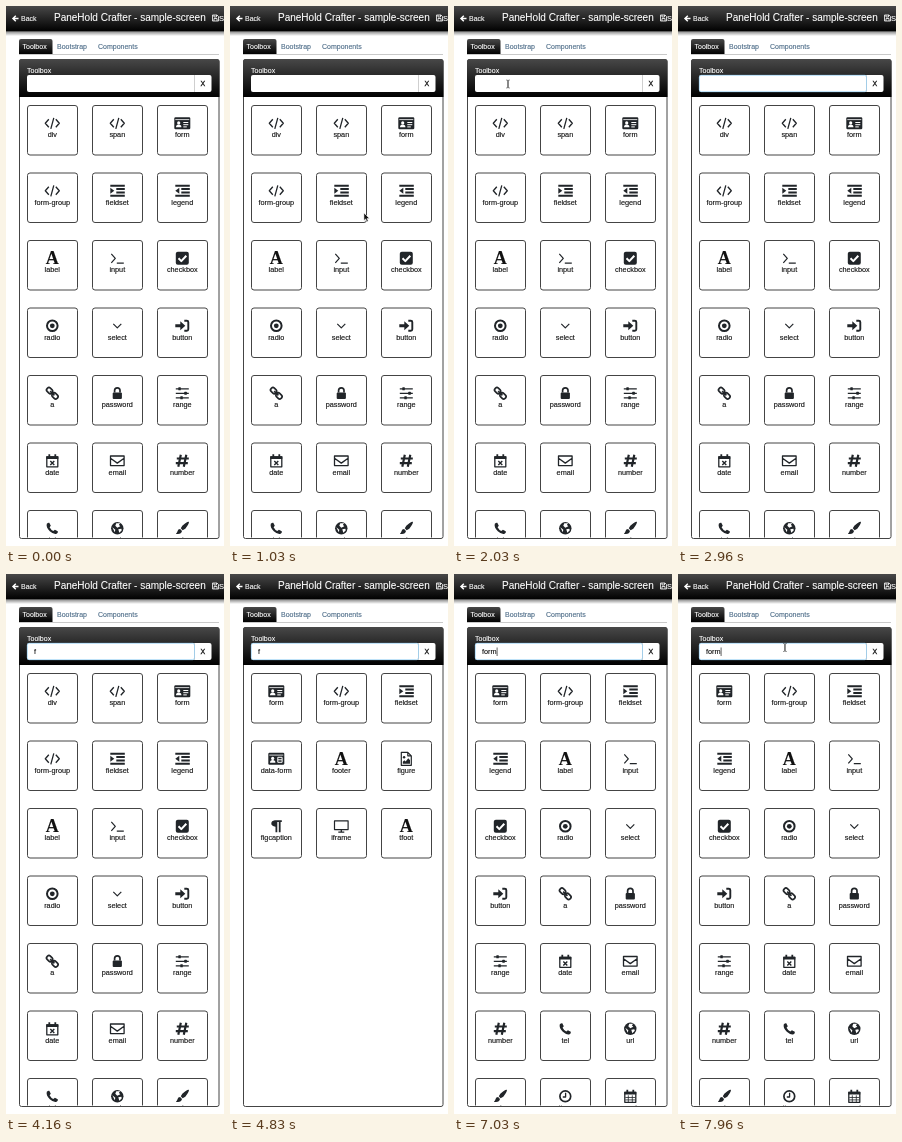
An HTML page that plays this animation: 218 px wide and 540 px high, repeating every 8000 ms.

```html
<!DOCTYPE html>
<html lang="en">
<head>
<meta charset="utf-8">
<title>Toolbox search</title>
<style>
html, body { margin: 0; height: 100%; overflow: hidden; background: #fff; }
svg { display: block; width: 100vw; height: 100vh; }
text { font: 7px "Liberation Sans", Arial, sans-serif; fill: #111; stroke: #111; stroke-width: .12px; }
.light { fill: #fff; stroke: #fff; }
.link { fill: #4d6c88; stroke: #4d6c88; }
.title { font-size: 10px; }
.label { font-size: 7.3px; text-anchor: middle; }
.serif { font: bold 18px "Liberation Serif", serif; text-anchor: middle; }
</style>
</head>
<body>
<svg viewBox="0 0 218 540">
  <defs>
    <linearGradient id="dark" x2="0" y2="1"><stop stop-color="#484848"/><stop offset="1"/></linearGradient>
    <linearGradient id="shade" x2="0" y2="1"><stop stop-opacity=".45"/><stop offset="1" stop-opacity="0"/></linearGradient>
    <clipPath id="inside"><path d="M13 91H213V531.500H13Z"/></clipPath>
  </defs>
  <rect width="218" height="540" fill="#fff"/>
  <rect width="218" height="25.500" fill="url(#dark)"/>
  <rect y="25.500" width="218" height="4.500" fill="url(#shade)"/>
  <path d="M12.500 12.500H7.500M9.800 9.800L7 12.500L9.800 15.200" fill="none" stroke="#fff" stroke-width="1.500"/>
  <text class="light" x="15" y="14.700">Back</text>
  <text class="light title" x="48" y="15.200">PaneHold Crafter - sample-screen</text>
  <path d="M206.500 9H211L212.500 10.500V15H206.500ZM208 9V11H210.500V9M208 15V12.500H211V15" fill="none" stroke="#fff" stroke-width=".8"/>
  <text class="light" x="213" y="15" style="font-size:7.500px">Save</text>

  <path d="M13 48.500H213" stroke="#bbb" stroke-width=".8"/>
  <path d="M13 48V35Q13 33 15 33H44.500Q46.500 33 46.500 35V48Z" fill="url(#dark)"/>
  <text class="light" x="16.500" y="43">Toolbox</text>
  <text class="link" x="51" y="43">Bootstrap</text>
  <text class="link" x="92" y="43">Components</text>

  <rect x="13.500" y="53.500" width="199.500" height="479" rx="2" fill="#fff" stroke="#444"/>
  <path d="M13 91V55.500Q13 53 15.500 53H211Q213.500 53 213.500 55.500V91Z" fill="url(#dark)"/>
  <text class="light" x="21" y="66.500">Toolbox</text>
  <rect x="21" y="69" width="184.500" height="17" rx="2" fill="#fff"/>
  <path d="M188.500 69V86" stroke="#bbb" stroke-width=".7"/>
  <text x="194.500" y="80" style="stroke-width:.3px">X</text>
  <rect id="ring" x="21.300" y="69.300" width="167.200" height="16.400" rx="2" fill="none" stroke="#8fccf2" stroke-width=".7"/>
  <text id="query" x="28" y="80" style="font-size:7.300px"></text>
  <path id="caret" stroke="#222" stroke-width=".7"/>
  <g clip-path="url(#inside)" id="list"></g>
  <path id="arrow" d="M0 0V7.500L1.800 6L3 8.800L4.300 8.200L3.100 5.600H5.500Z" fill="#111" stroke="#fff" stroke-width=".5"/>
  <path id="beam" d="M-1.700-4Q0-4 0-3V3Q0 4-1.700 4M1.700-4Q0-4 0-3V3Q0 4 1.700 4" fill="none" stroke="#333" stroke-width=".7"/>
</svg>
<script>
const $ = id => document.getElementById(id);
const ink = '#212529';
const line = (d, w = 1.3, c = ink) =>
  `<path d="${d}" fill="none" stroke="${c}" stroke-width="${w}" stroke-linejoin="round"/>`;
const fill = (d, c = ink) => `<path d="${d}" fill="${c}"/>`;
const dot = (x, y, r, c = ink) => `<circle cx="${x}" cy="${y}" r="${r}" fill="${c}"/>`;
const ring = (r, w) => `<circle r="${r}" fill="none" stroke="${ink}" stroke-width="${w}"/>`;
const box = (x, y, w, h, r, c = ink) =>
  `<rect x="${x}" y="${y}" width="${w}" height="${h}" rx="${r}" fill="${c}"/>`;

const card = box(-8, -6, 16, 12, 1.2) + line('M-7-3.700H7', .8, '#fff') +
  dot(-3.6, -.4, 1.6, '#fff') + fill('M-6.300 4Q-6.300 1.300-3.600 1.300T-.9 4Z', '#fff');
const bars = line('M-7-5H7.500M-1-1.700H7.500M-1 1.700H7.500M-7 5H7.500', 2);
const calendar = line('M-5.500-4H5.500V6H-5.500Z') + fill('M-6-4.600H6V-1.800H-6Z') + line('M-3-6.500V-4M3-6.500V-4', 1.8);
const letter = '<text class="serif" y="6">A</text>';
const icons = {
  code: line('M-3.500-4L-7 0L-3.500 4M3.500-4L7 0L3.500 4M1.500-5.500L-1.500 5.500', 1.3),
  card: card + line('M1-.8H6M1 1.400H6M1 3.600H4.500', 1, '#fff'),
  dataCard: card + line('M1.500-1.500H5.800V3.500H1.500ZM1.500 1H5.800', 1, '#fff'),
  indent: bars + fill('M-7-3L-3 0L-7 3Z'),
  outdent: bars + fill('M-3-3L-7 0L-3 3Z'),
  letter,
  pilcrow: fill('M5.500-6V-4.300H4.300V6H2.500V-4.300H1V6H-.8V.5Q-5-.2-5-2.800T-1.500-6Z'),
  prompt: line('M-6-4.500L-2 0L-6 4.500M-.5 4.800H6.500', 1.2),
  check: box(-6.5, -6.5, 13, 13, 2) + line('M-3.800 0L-1 2.800L4-2.500', 2, '#fff'),
  radio: ring(5.3, 2) + dot(0, 0, 2.4),
  chevron: line('M-4-2L0 2L4-2', 1.2),
  enter: fill('M-7-1.500H-2V-4.500L3 0L-2 4.500V1.500H-7Z') + line('M2-5H4.500Q6-5 6-3.500V3.500Q6 5 4.500 5H2', 1.9),
  chain: `<g transform="rotate(45)" fill="none" stroke="${ink}" stroke-width="1.700">
    <rect x="-7" y="-2.300" width="6.500" height="4.600" rx="2"/><rect x=".5" y="-2.300" width="6.500" height="4.600" rx="2"/><path d="M-3 0H3"/></g>`,
  lock: box(-4.6, -.8, 9.2, 6.5, 1) + line('M-2.700-.8V-2.800A2.700 2.700 0 0 1 2.700-2.800V-.8', 1.7),
  sliders: line('M-6.500-4.500H6.500M-6.500 0H6.500M-6.500 4.500H6.500', 1.3) + box(-4, -6, 2.5, 3, .5) + box(2, -1.5, 2.5, 3, .5) + box(-2, 3, 2.5, 3, .5),
  calendarX: calendar + line('M-2 .3L2 4.300M2 .3L-2 4.300', 1.4),
  calendarGrid: calendar + line('M-5 1.200H5M-5 3.600H5M-2-1V6M2-1V6', .8),
  mail: line('M-6.800-4.800H6.800V4.800H-6.800ZM-6.800-2.500L0 2.300L6.800-2.500', 1.3),
  hash: line('M-1.500-6L-4 6M4-6L1.500 6M-5.500-2.300H6.500M-6.500 2.300H5.500', 2.2),
  phone: fill('M-5.500-4.500Q-4-6-3-5.500L-1.500-2.500L-2.700-1Q-1.300 1.800 1 2.700L2.600 1.500L5.500 3Q6 4.500 4.300 5.500Q1.500 6.500-2.500 3Q-6.500-1-5.500-4.500Z'),
  globe: dot(0, 0, 6.2) + fill('M-1-5L3-5L1.500-3.500L3-2L0-.5L-2-2.500ZM1 1L4 .5L4.500 2L2 4.500ZM-5-1L-2 1.500L-2.500 4Z', '#fff'),
  brush: fill('M6.500-6.500Q7.500-5.500 3 .5L.3 2L-1.500 0L0-2.500Q5.500-7.500 6.500-6.500ZM-2.200 .7L-.3 2.800Q-1 6.500-6.500 5.500Q-5 4.500-4.700 2.700T-2.200 .7Z'),
  clock: ring(5.4, 1.7) + line('M.3-3.500V.7H-2.500', 1.3),
  picture: line('M-5-6.500H1.500L5-3V6.500H-5ZM1.500-6.500V-3H5', 1.2) + dot(-2.2, -1.5, 1.2) + fill('M-3.500 5V3L-2 1.500L-.7 2.800L2-.5L3.700 1.500V5Z'),
  screen: line('M-6.800-5.500H6.800V3.300H-6.800Z', 1.2) + line('M0 3.500V5.500M-3 5.800H3', 1.3)
};

const parse = s => s.split(' ').map(p => p.split(':'));
const all = parse('div:code span:code form:card form-group:code fieldset:indent legend:outdent label:letter ' +
  'input:prompt checkbox:check radio:radio select:chevron button:enter a:chain password:lock range:sliders ' +
  'date:calendarX email:mail number:hash tel:phone url:globe color:brush time:clock week:calendarGrid');
const lists = [
  all.slice(0, 21),
  parse('form:card form-group:code fieldset:indent data-form:dataCard footer:letter figure:picture ' +
    'figcaption:pilcrow iframe:screen tfoot:letter'),
  all.slice(2)
];

const tile = ([name, icon], i) =>
  `<g transform="translate(${21 + i % 3 * 65} ${99 + Math.floor(i / 3) * 67.5})">
    <rect x=".5" y=".5" width="50" height="49.500" rx="2.500" fill="#fff" stroke="#444"/>
    <g transform="translate(25.300 18.300)">${icons[icon]}</g>
    <text class="label" x="25.300" y="32">${name}</text></g>`;

// Pointer path: time, x, y
const path = [
  [500, 209, 277], [567, 145, 225], [633, 186, 257], [900, 186, 257], [1033, 134, 207],
  [1300, 76, 122.5], [1433, 68, 122], [1700, 68, 122], [2033, 54, 78], [2433, 54, 78],
  [2700, 42, 76], [7433, 42, 76], [7967, 107, 73.5]
];
// Caret toggles: time, visible
const blinks = [[0, 0], [2500, 1], [2960, 0], [3500, 1], [4160, 0], [4430, 1], [4830, 0],
  [5360, 1], [5960, 0], [6160, 1], [6700, 0], [7030, 1], [7500, 0], [7960, 1]];
const keys = [3630, 5360, 5500, 6160];
const widths = [0, 2, 6.1, 8.5, 14.6];

function pointer(t) {
  const k = path.findIndex(p => p[0] > t);
  if (k < 1) return path[k ? path.length - 1 : 0].slice(1);
  const [a, b] = [path[k - 1], path[k]], f = (t - a[0]) / (b[0] - a[0]);
  return [a[1] + (b[1] - a[1]) * f, a[2] + (b[2] - a[2]) * f];
}

const show = (id, on) => $(id).setAttribute('visibility', on ? 'visible' : 'hidden');
let shown = -1;

function draw() {
  const t = performance.now() % 8000;
  const step = Math.floor((t - 26) / 66.667) * 66.667 + 33.333;

  const list = t < 4430 ? 0 : t < 7030 ? 1 : 2;
  if (list !== shown) {
    $('list').innerHTML = lists[list].map(tile).join('');
    shown = list;
  }

  const typed = keys.filter(k => t >= k).length;
  $('query').textContent = 'form'.slice(0, typed);
  $('caret').setAttribute('d', `M${28.5 + widths[typed]} 73.500V82`);
  show('caret', blinks.findLast(b => t >= b[0])[1]);
  $('ring').setAttribute('opacity', Math.max(0, Math.min(1, (step - 2433) / 267)));

  const [x, y] = pointer(step);
  const visible = t >= 500 && t < 2960 || t >= 7500;
  for (const id of ['arrow', 'beam']) {
    $(id).setAttribute('transform', `translate(${x} ${y})`);
    show(id, visible && (id === 'beam') === (y < 87));
  }
  if (!list) {
    const hover = visible && x < 72 && y > 99;
    $('list').querySelector('rect').setAttribute('fill', hover ? '#e6e6e6' : '#fff');
  }
  requestAnimationFrame(draw);
}
draw();
</script>
</body>
</html>
```
